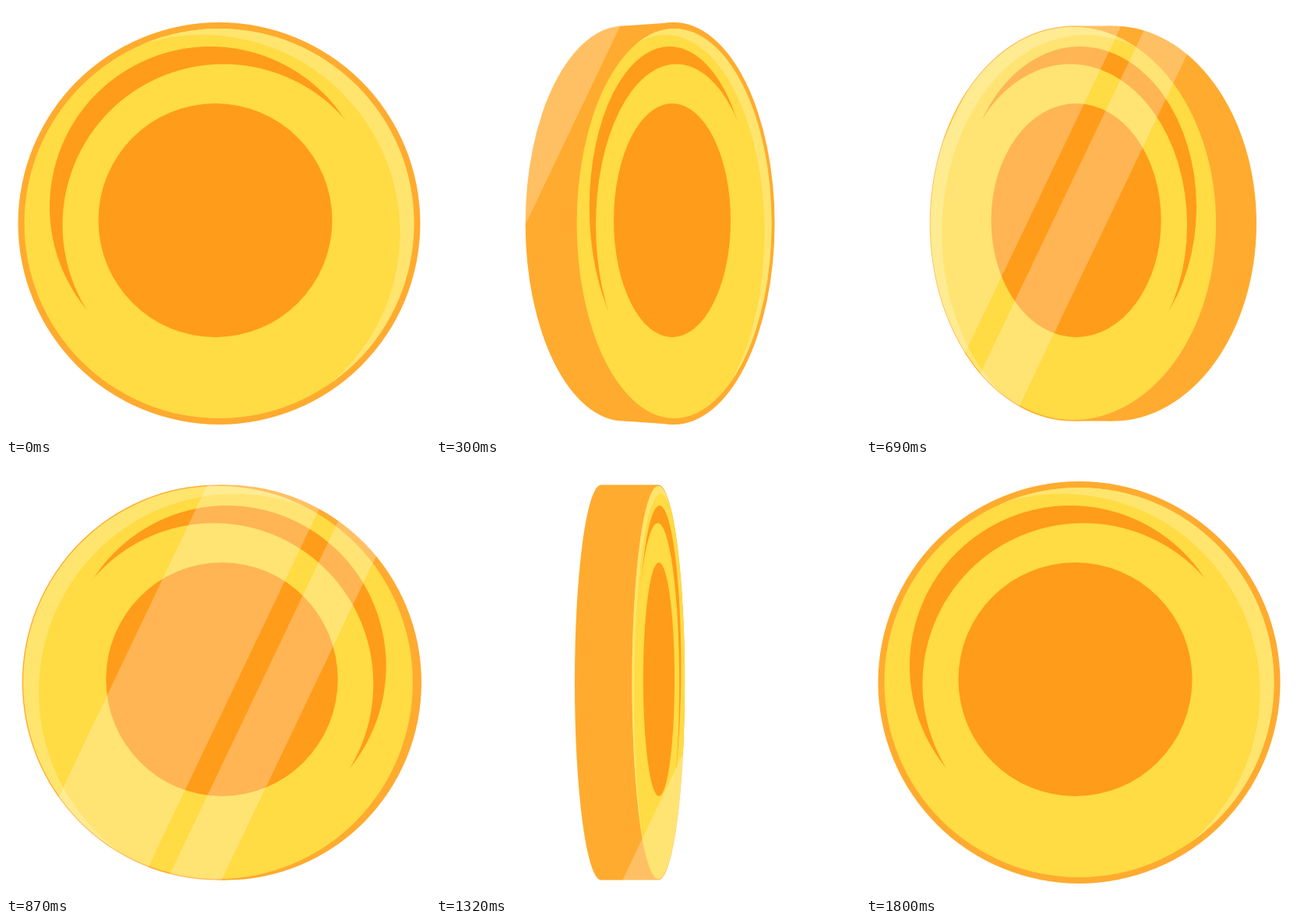
An HTML page with a canvas that plays this animation: 544x553 px, repeating every 1830 ms.

```html
<!DOCTYPE html>
<html lang="en">
<head>
<meta charset="utf-8">
<title>Spinning coin</title>
<style>
  html, body { margin: 0; width: 100%; height: 100%; overflow: hidden; background: #fff; }
  canvas { display: block; }
</style>
</head>
<body>
<canvas id="stage" width="544" height="553"></canvas>
<script>
const ctx = document.getElementById('stage').getContext('2d');
const W = 544, H = 553, CX = 273.5, CY = 279;
const LOOP = 1830, STEP = 30, TAU = Math.PI * 2;
const HALF_DEPTH = 37;
const EDGE = '#ffab2f', FACE = '#ffdb44', GLOW = '#ffe56e', MARK = '#ff9c1a';

// time in ms, turn in degrees
const TURN = [[0, 0], [300, 60], [540, 106.7], [870, 172.5], [1110, 221], [1560, 309.5], [1800, 360]];

function angleAt(t) {
  for (let i = 1; i < TURN.length; i++) {
    const [t0, a0] = TURN[i - 1], [t1, a1] = TURN[i];
    if (t <= t1) return (a0 + (a1 - a0) * (t - t0) / (t1 - t0)) * TAU / 360;
  }
  return TAU;
}

function smooth(lo, hi, v) {
  const k = Math.min(1, Math.max(0, (v - lo) / (hi - lo)));
  return k * k * (3 - 2 * k);
}

function disc(x, y, r, color) {
  ctx.beginPath();
  ctx.arc(x, y, r, 0, TAU);
  ctx.fillStyle = color;
  ctx.fill();
}

// the part of the first disc that lies outside the second
function crescent(a, b, color) {
  ctx.save();
  ctx.beginPath();
  ctx.rect(-600, -600, 1200, 1200);
  ctx.moveTo(b[0] + b[2], b[1]);
  ctx.arc(...b, 0, TAU);
  ctx.clip('evenodd');
  disc(...a, color);
  ctx.restore();
}

function drawBody(x1, r1, x2, r2, squash) {
  ctx.fillStyle = EDGE;
  for (const [x, r] of [[x1, r1], [x2, r2]]) {
    ctx.beginPath();
    ctx.ellipse(x, CY, r * squash, r, 0, 0, TAU);
    ctx.fill();
  }
  ctx.beginPath();
  ctx.moveTo(x1, CY - r1);
  ctx.lineTo(x2, CY - r2);
  ctx.lineTo(x2, CY + r2);
  ctx.lineTo(x1, CY + r1);
  ctx.fill();
}

// a negative squash mirrors the face for the reverse side
function drawFace(x, r, squash) {
  ctx.save();
  ctx.translate(x, CY);
  ctx.scale(squash, 1);
  disc(0, 0, r, FACE);
  crescent([0, 0, r], [-22, 12, 254], GLOW);
  crescent([-11.5, -21, 206], [5.5, 2, 206.5], MARK);
  disc(-5, -4, 150, MARK);
  ctx.restore();
}

function drawBand(from, to) {
  const lean = 0.477 * H;
  ctx.beginPath();
  ctx.moveTo(from, 0);
  ctx.lineTo(to, 0);
  ctx.lineTo(to - lean, H);
  ctx.lineTo(from - lean, H);
  ctx.fill();
}

function drawShine(t) {
  const s = 0.495 * t;
  ctx.save();
  ctx.globalCompositeOperation = 'source-atop';
  ctx.fillStyle = 'rgba(255,255,255,.25)';
  drawBand(s - 160, s - 2);
  drawBand(s + 30, s + 100);
  ctx.restore();
}

function draw(t) {
  const a = angleAt(t), c = Math.cos(a), s = Math.sin(a);
  const heads = c >= 0;
  // the pivot drifts while the reverse side is turned to the viewer
  const back = smooth(0.45, -0.2, c);
  const rest = a > Math.PI ? -5 : 0;
  const mid = CX + s * (rest + (26 - rest) * back);
  const front = mid + HALF_DEPTH * s, rear = mid - HALF_DEPTH * s;

  ctx.clearRect(0, 0, W, H);
  drawBody(front, heads ? 258 : 253.5, rear, 253.5, Math.abs(c));
  drawFace(heads ? front : rear, heads ? 250 : 252, c);
  drawShine(t);
}

function tick(now) {
  draw(Math.floor((now % LOOP) / STEP) * STEP);
  requestAnimationFrame(tick);
}

draw(0);
requestAnimationFrame(tick);
</script>
</body>
</html>
```
